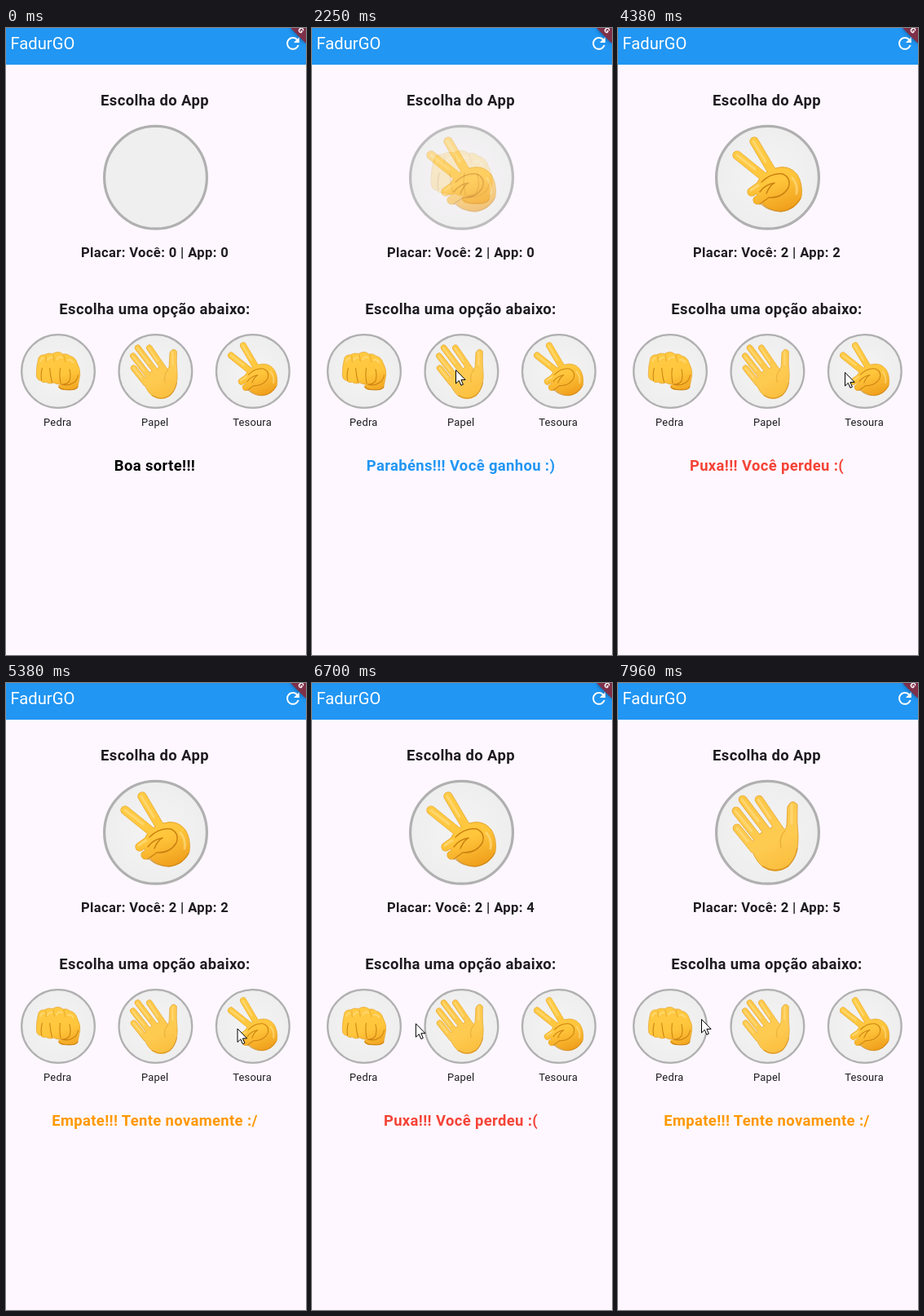
An HTML page for the animation above (8000 ms loop, 368 by 769 pixels).

```html
<!DOCTYPE html>
<html lang="pt">
<head>
<meta charset="utf-8">
<style>
  html, body { margin: 0; width: 100%; height: 100%; overflow: hidden; background: #fef7ff; }
  svg { display: block; }
  text { font-family: Roboto, sans-serif; letter-spacing: .23px; fill: #1d1b20; text-anchor: middle; }
  .big, .score { font-weight: 600; letter-spacing: .38px; }
  .big { font-size: 18.4px; }
  .score { font-size: 16.56px; }
  .label { font-size: 12.9px; }
  .title { font-size: 20.2px; letter-spacing: 0; fill: #fff; text-anchor: start; }
  .rim { stroke: #b0b0b0; stroke-width: 3.2; }
  .skin { fill: url(#gold); stroke: #e2a02a; stroke-width: .9; }
  .edge, .finger, .crease, .shine { fill: none; stroke-linecap: round; stroke-linejoin: round; }
  .edge { stroke: #e2a02a; stroke-width: 11.2; }
  .finger { stroke: url(#gold); stroke-width: 10; }
  .crease { stroke: #cc8212; stroke-width: 1.5; }
  .shine { stroke: #ffe08a; stroke-width: 3; opacity: .6; }
  #papel .skin { fill: url(#pale); }
  #papel .finger { stroke: url(#pale); stroke-width: 9.4; }
  #papel .edge { stroke-width: 10.6; }
  #banner { filter: drop-shadow(0 0 2.5px rgba(0, 0, 0, .5)); }
</style>
</head>
<body>
<svg width="368" height="769" viewBox="0 0 368 769">
  <defs>
    <linearGradient id="gold" gradientUnits="userSpaceOnUse" x1="165" y1="140" x2="195" y2="226">
      <stop offset="0" stop-color="#ffcb45"/>
      <stop offset=".6" stop-color="#ffc63c"/>
      <stop offset="1" stop-color="#f0a01c"/>
    </linearGradient>
    <linearGradient id="pale" gradientUnits="userSpaceOnUse" x1="160" y1="140" x2="205" y2="232">
      <stop offset="0" stop-color="#fdc746"/>
      <stop offset=".6" stop-color="#fecb52"/>
      <stop offset="1" stop-color="#fabd3c"/>
    </linearGradient>
    <radialGradient id="disc">
      <stop offset="0" stop-color="#f4f4f4"/>
      <stop offset="1" stop-color="#eeeeee"/>
    </radialGradient>

    <g id="vazio"><circle class="rim" cx="183.5" cy="183.3" r="62.9" fill="#efefef"/></g>

    <g id="pedra">
      <circle class="rim" cx="183.5" cy="183.3" r="62.9" fill="url(#disc)"/>
      <path class="skin" d="M149 163Q150 155 160 155Q166 151 174 153Q184 147 192 154Q199 152 204 157Q213 159 216 169Q222 180 221 190L217 211Q214 216 196 215Q184 215 184 209Q185 206 191 205Q182 207 176 203Q168 206 163 202Q157 204 153 199Q146 199 146 188Q146 175 149 163Z"/>
      <path class="shine" d="M153 166Q155 160 159 161M165 164Q169 158 173 160M181 163Q186 156 190 160M200 164Q206 162 209 168"/>
      <path class="crease" d="M156 178Q153 190 155 199M169 178Q170 192 173 202M187 178Q185 192 188 204M203 180Q206 190 203 200Q199 206 190 206Q201 209 210 203Q216 199 218 190"/>
      <path class="crease" opacity=".4" d="M162 157L163 167M175 155L177 166M193 155L196 167"/>
      <path class="crease" d="M185 210Q190 216 203 215Q214 216 217 210"/>
    </g>

    <g id="papel">
      <circle class="rim" cx="183.5" cy="183.3" r="62.9" fill="url(#disc)"/>
      <path class="edge" d="M173 143L199 181M153 143L185 185M145 157L174 194M146 178L167 204"/>
      <path class="skin" d="M163 198Q172 182 185 180Q196 168 200 177Q206 183 207 174L208 152Q213 141 220 149Q219 170 221 188Q222 211 209 225Q193 236 177 225Q165 214 163 198Z"/>
      <path class="finger" d="M173 143L199 181M153 143L185 185M145 157L174 194M146 178L167 204"/>
      <path class="shine" d="M172 143L187 166M152 143L172 169M144 157L164 182M146 178L159 194M213 150L213 172"/>
      <path class="crease" opacity=".35" d="M205 181Q197 189 200 202"/>
      <path class="crease" opacity=".6" d="M178 225Q193 234 208 225Q218 216 220 203"/>
    </g>

    <g id="tesoura">
      <circle class="rim" cx="183.5" cy="183.3" r="62.9" fill="url(#disc)"/>
      <path class="edge" d="M167 139L190 178M146 156L182 185"/>
      <path class="edge" d="M164 201L178 191M171 211L184 205"/>
      <path class="skin" d="M172 187Q181 175 193 172Q210 167 220 180Q227 191 225 207Q217 224 200 225Q184 224 175 213L168 200Z"/>
      <path class="finger" d="M167 139L190 178M146 156L182 185"/>
      <path class="finger" d="M171 211L184 205M164 201L178 191"/>
      <path class="shine" d="M166 139L181 164M146 156L168 173M214 184Q221 192 219 203M163 199L172 193"/>
      <path class="crease" stroke-width="3" d="M174 201Q180 192 192 190Q186 193 182 203"/>
      <path class="crease" d="M176 189Q188 177 202 179Q213 184 209 196Q201 209 185 208Q178 213 174 216"/>
      <path class="crease" opacity=".7" d="M176 216Q186 225 200 225Q216 223 224 209"/>
    </g>
  </defs>

  <rect width="368" height="769" fill="#fef7ff"/>
  <rect width="368" height="45" fill="#2196f3"/>
  <text class="title" x="5.5" y="26">FadurGO</text>
  <path transform="translate(340.2 7.2) scale(.98)" fill="#fff" d="M17.65 6.35C16.2 4.9 14.21 4 12 4c-4.42 0-7.99 3.58-7.99 8s3.57 8 7.99 8c3.73 0 6.84-2.55 7.73-6h-2.08c-.82 2.33-3.04 4-5.65 4-3.31 0-6-2.69-6-6s2.69-6 6-6c1.66 0 3.14.69 4.22 1.78L13 11h7V4l-2.35 2.35z"/>
  <path id="banner" d="M349 0H368V19Z" fill="#7f3049"/>
  <text transform="translate(359.5 5) rotate(45)" style="font-size:9.4px;font-weight:900;fill:#fff">G</text>

  <text class="big" x="182.5" y="95">Escolha do App</text>
  <use id="oldHand"/><use id="newHand"/>
  <text class="score" id="score" x="182.5" y="280.5"></text>
  <text class="big" x="182.5" y="351">Escolha uma opção abaixo:</text>
  <g id="choices"></g>
  <text class="big" id="oldMsg" x="182.5" y="542.5"></text>
  <text class="big" id="newMsg" x="182.5" y="542.5"></text>
  <path id="cursor" d="M0 0V16.5L3.8 12.9L6.4 18.8L8.9 17.7L6.4 11.9H11.6Z" fill="#fff" stroke="#000" stroke-width="1"/>
</svg>
<script>
const LOOP = 8000, FADE = 300;
const $ = id => document.getElementById(id);

$('choices').innerHTML = ['Pedra', 'Papel', 'Tesoura'].map((name, i) =>
  `<use href="#${name.toLowerCase()}" transform="translate(${64 + 119.4 * i} 421) scale(.713) translate(-183.5 -183.3)"/>
   <text class="label" x="${63.3 + 119.4 * i}" y="488">${name}</text>`).join('');

const MESSAGES = {
  start: ['Boa sorte!!!', '#000'],
  win: ['Parabéns!!! Você ganhou :)', '#2196f3'],
  loss: ['Puxa!!! Você perdeu :(', '#f44336'],
  tie: ['Empate!!! Tente novamente :/', '#ff9800']
};

// time, app's hand, result, player's score, app's score
const ROUNDS = [
  [-FADE, 'vazio', 'start', 0, 0],
  [1060, 'tesoura', 'win', 1, 0],
  [2175, 'pedra', 'win', 2, 0],
  [2875, 'pedra', 'loss', 2, 1],
  [3850, 'tesoura', 'loss', 2, 2],
  [4750, 'tesoura', 'tie', 2, 2],
  [5400, 'pedra', 'loss', 2, 3],
  [6240, 'tesoura', 'loss', 2, 4],
  [6970, 'papel', 'loss', 2, 5],
  [7470, 'papel', 'tie', 2, 5]
];

// time, x, y of the pointer tip
const PATH = [
  [380, 150, 730], [910, 70, 420], [1400, 70, 420], [1710, 172, 421],
  [1970, 172, 421], [2150, 176.5, 419.5], [2460, 176.5, 419.5], [2710, 287.5, 421.5],
  [3370, 287.5, 421.5], [3710, 190, 420], [4150, 190, 420], [4380, 278.5, 422.5],
  [4640, 284, 424], [5720, 284, 424], [6060, 200.5, 417.5], [6540, 200.5, 417.5],
  [6830, 75, 418], [7060, 75, 418], [7300, 158.5, 412.5], [7420, 172, 415],
  [7800, 172, 415], [7960, 102.5, 412.5]
];

function pointer(t) {
  const i = PATH.findIndex(p => p[0] > t);
  if (i < 0) return PATH.at(-1).slice(1);
  const [t0, x0, y0] = PATH[i - 1], [t1, x1, y1] = PATH[i];
  const u = (t - t0) / (t1 - t0), e = u * u * (3 - 2 * u);
  return [x0 + (x1 - x0) * e, y0 + (y1 - y0) * e];
}

function show(side, round, handAlpha, msgAlpha) {
  const [text, color] = MESSAGES[round[2]], hand = $(side + 'Hand'), msg = $(side + 'Msg');
  hand.setAttribute('href', '#' + round[1]);
  hand.style.opacity = handAlpha;
  msg.textContent = text;
  msg.style.fill = color;
  msg.style.opacity = msgAlpha;
}

function draw(t) {
  const now = ROUNDS.findLast(r => r[0] <= t);
  const before = ROUNDS[Math.max(0, ROUNDS.indexOf(now) - 1)];
  const k = Math.min(1, (t - now[0]) / FADE);
  const handK = before[1] === now[1] ? 1 : k, msgK = before[2] === now[2] ? 1 : k;
  show('old', before, 1 - handK, 1 - msgK);
  show('new', now, handK, msgK);
  $('score').textContent = `Placar: Você: ${now[3]} | App: ${now[4]}`;

  const visible = t >= PATH[0][0];
  $('cursor').style.display = visible ? '' : 'none';
  if (visible) $('cursor').setAttribute('transform', `translate(${pointer(t)})`);
}

const start = performance.now();
function tick() {
  draw((performance.now() - start) % LOOP);
  requestAnimationFrame(tick);
}
tick();
</script>
</body>
</html>
```
